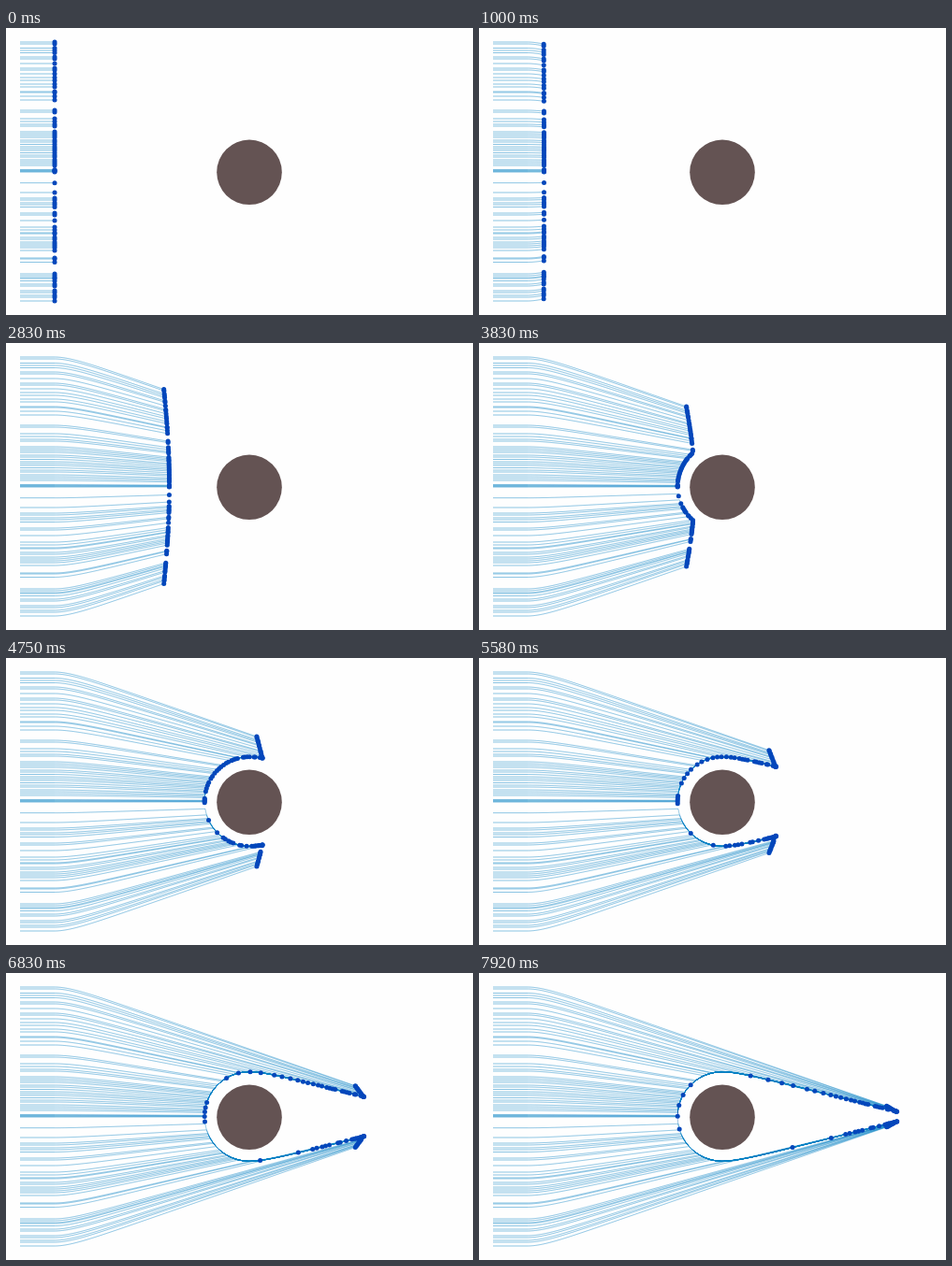
Animation of 499x307 px, one loop 8000 ms. Source, as an HTML page with a canvas:

```html
<!DOCTYPE html>
<html lang="en">
<head>
<meta charset="utf-8">
<title>Particles around an obstacle</title>
<style>
  html, body { margin: 0; width: 100%; height: 100%; overflow: hidden; background: #fefefe; }
  canvas { display: block; }
</style>
</head>
<body>
<canvas id="stage" width="499" height="307"></canvas>
<script>
const ctx = document.getElementById('stage').getContext('2d');
const LOOP = 8000, FPS = 12;
const START_X = 52, TAIL_X = 15;
const goal = { x: 468, y: 153.6 };
const disc = { x: 260, y: 154.3, r: 34.8 };
const shield = { x: 260, y: 153.5, r: 47.8 };
const STEP = 0.5;   // path length per simulation step, px
const LAG = 17;     // steering response length, px

const starts = [
  15, 17, 21.5, 24, 26.5, 31, 33, 38, 43, 45, 49, 53, 56, 60, 63, 68, 69, 73, 77,
  88, 90, 97, 100, 103, 105, 111, 113, 115, 117, 120, 122, 124.5, 127, 129, 131,
  133.5, 136, 138, 141, 143, 145, 147, 151.5, 152.2, 152.8, 153.4, 154.1,
  165.7, 176, 182, 184, 187, 189, 191.5, 198, 200, 206, 213, 216, 219, 220,
  224, 226, 229, 231, 233, 235, 238, 246, 247, 250.5, 263, 265, 267, 268, 270.5,
  274, 276, 281, 283, 286, 288, 292
];

// Frame index and distance travelled by then
const pace = [[8, 0], [21, 57.5], [34, 122.5], [46, 178.5], [67, 272], [82, 339], [95, 405]];

function travelled(frame) {
  if (frame <= pace[0][0]) return 0;
  for (let i = 1; i < pace.length; i++) {
    const [f0, s0] = pace[i - 1], [f1, s1] = pace[i];
    if (frame <= f1) return s0 + (s1 - s0) * (frame - f0) / (f1 - f0);
  }
  return pace[pace.length - 1][1];
}

// Seek the goal; slide along the shield on contact
function trace(startY) {
  let x = START_X, y = startY, vx = 1, vy = 0;
  const path = [[x, y]];
  const steps = pace[pace.length - 1][1] / STEP;
  for (let i = 0; i < steps; i++) {
    const gx = goal.x - x, gy = goal.y - y, d = Math.hypot(gx, gy);
    vx += (gx / d - vx) * STEP / LAG;
    vy += (gy / d - vy) * STEP / LAG;
    x += vx * STEP;
    y += vy * STEP;
    const cx = x - shield.x, cy = y - shield.y, r = Math.hypot(cx, cy);
    if (r < shield.r) {
      const nx = cx / r, ny = cy / r;
      x = shield.x + nx * shield.r;
      y = shield.y + ny * shield.r;
      const inward = Math.min(0, vx * nx + vy * ny);
      vx -= inward * nx;
      vy -= inward * ny;
    }
    path.push([x, y]);
  }
  return path;
}

const paths = starts.map(trace);

function dot(x, y, r, color) {
  ctx.fillStyle = color;
  ctx.beginPath();
  ctx.arc(x, y, r, 0, Math.PI * 2);
  ctx.fill();
}

function draw(frame) {
  ctx.fillStyle = '#fefefe';
  ctx.fillRect(0, 0, 499, 307);
  dot(disc.x, disc.y, disc.r, '#645353');

  const last = Math.round(travelled(frame) / STEP);
  ctx.strokeStyle = 'rgba(8,128,196,0.72)';
  ctx.lineWidth = 0.65;
  ctx.lineJoin = 'round';
  for (const path of paths) {
    ctx.beginPath();
    ctx.moveTo(TAIL_X, path[0][1]);
    for (let i = 0; i <= last; i++) ctx.lineTo(path[i][0], path[i][1]);
    ctx.stroke();
  }
  for (const path of paths) dot(path[last][0], path[last][1], 2.5, '#0447bb');
}

let shown = -1;
const begin = performance.now();

function tick() {
  const t = (performance.now() - begin) % LOOP;
  const frame = Math.floor((t + 4) * FPS / 1000) % (LOOP * FPS / 1000);
  if (frame !== shown) draw(shown = frame);
  requestAnimationFrame(tick);
}
tick();
</script>
</body>
</html>
```
